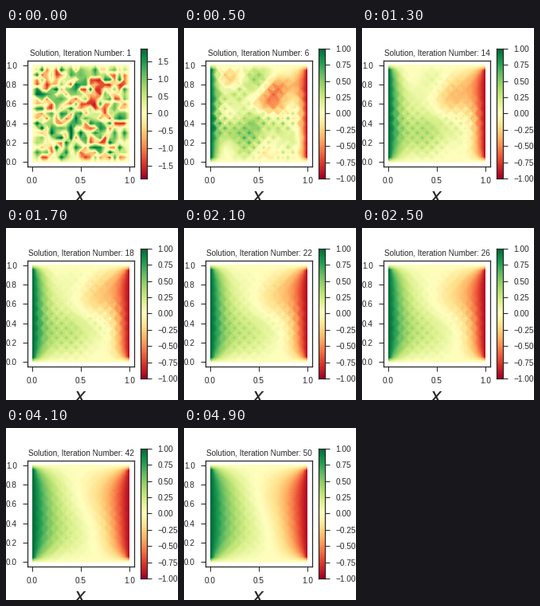
A matplotlib script for the animation above (5000 ms loop, 216 by 216 pixels).

```python
import numpy as np
import matplotlib.pyplot as plt
from matplotlib.animation import FuncAnimation

SIZE, FRAMES, NODES = 216, 50, 21
INK = "0.15"
PEAK = 1.87

plt.rcParams.update({
    "font.family": "Liberation Sans", "font.size": 10,
    "text.color": INK, "xtick.color": INK, "ytick.color": INK,
    "axes.edgecolor": INK, "axes.linewidth": 1.25,
    "mathtext.fontset": "dejavusans", "text.kerning_factor": 6,
})


def bump(x0, y0, width):
    return np.exp(-((X - x0) ** 2 + (Y - y0) ** 2) / (2 * width ** 2))


def initial_field():
    """Uniform noise with a slightly warm and a slightly cool region."""
    u = np.random.default_rng(7).uniform(-PEAK, PEAK, X.shape)
    u += 0.35 * bump(0.3, 0.3, 0.2) - 0.3 * bump(0.7, 0.75, 0.2)
    u[[0, -1]] = 0
    u[:, [0, -1]] = 0
    return np.clip(u, -PEAK, PEAK)


def relax(u):
    """One Jacobi step of Laplace's equation with fixed edges."""
    new = np.zeros_like(u)
    new[1:-1, 1:-1] = (u[:-2, 1:-1] + u[2:, 1:-1] + u[1:-1, :-2] + u[1:-1, 2:]) / 4
    new[1:-1, 0], new[1:-1, -1] = 1, -1
    return new


def panel(left, bottom, width, height):
    ax = fig.add_axes([v / SIZE for v in (left, bottom, width, height)])
    ax.tick_params(length=6, width=1, pad=7, labelsize=10)
    return ax


X, Y = np.meshgrid(*[np.linspace(0, 1, NODES)] * 2)
states = [initial_field()]
while len(states) < FRAMES:
    states.append(relax(states[-1]))

fig = plt.figure(figsize=(SIZE / 72, SIZE / 72), dpi=72, facecolor="white")

ax = panel(27, 41.58, 133.92, 133.92)
ax.set(xlim=(-0.05, 1.05), ylim=(-0.05, 1.05),
       xticks=[0, 0.5, 1], yticks=np.linspace(0, 1, 6))
ax.set_autoscale_on(False)
ax.xaxis.set_major_formatter("{x:.1f}")
ax.yaxis.set_major_formatter("{x:.1f}")
title = ax.set_title("", fontsize=10, pad=6)
fig.text(94 / SIZE, -3 / SIZE, "$x$", fontsize=24, ha="center", va="baseline")

bar = panel(169.29, 27, 8.154, 163.08)
bar.imshow(np.linspace(0, 1, 256)[:, None], cmap="RdYlGn", origin="lower",
           extent=(0, 1, 0, 1), aspect="auto")
bar.set_xticks([])
bar.yaxis.tick_right()


def draw_scale(limit):
    step, digits = (0.5, 1) if limit > 1.1 else (0.25, 2)
    count = int(limit / step)
    ticks = np.arange(-count, count + 1) * step
    labels = [f"{t:.{digits}f}".replace("-", "\u2212") for t in ticks]
    bar.set_yticks((ticks / limit + 1) / 2, labels)


def draw(i):
    for old in list(ax.collections):
        old.remove()
    limit = max(1, np.abs(states[i]).max())
    ax.contourf(X, Y, states[i], np.linspace(-limit, limit, 101), cmap="RdYlGn")
    draw_scale(limit)
    title.set_text(f"Solution, Iteration Number: {i + 1}")
    return [title]


anim = FuncAnimation(fig, draw, frames=FRAMES, interval=100, repeat=True,
                     repeat_delay=0, blit=False)
plt.show()
```
